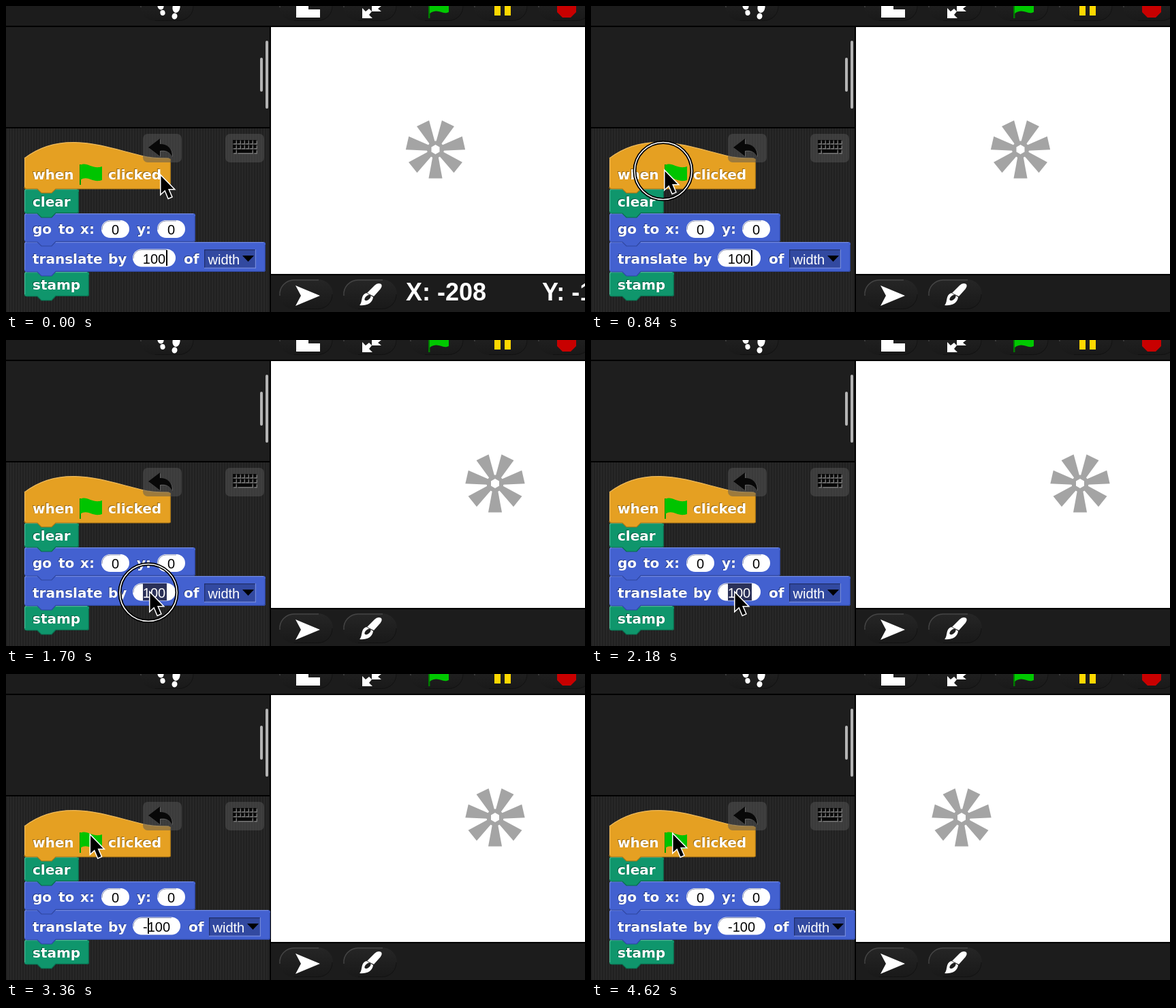
An HTML page with a canvas for the animation above (4.64 s loop, 850 by 450 pixels).

```html
<!DOCTYPE html>
<html lang="en">
<head>
<meta charset="utf-8">
<style>
html, body { margin: 0; width: 850px; height: 450px; overflow: hidden; background: #1c1c1c; }
canvas { display: block; }
</style>
</head>
<body>
<canvas id="stage" width="850" height="450"></canvas>
<script>
const c = document.getElementById('stage').getContext('2d');
const LOOP = 4640;
const LABEL = 'bold 20px "DejaVu Sans", sans-serif';
const VALUE = '20px "Liberation Sans", Arial, sans-serif';
const STATUS = 'bold 36px "Liberation Sans", Arial, sans-serif';

// Cursor keys: time, x, y
const route = [[0, 227, 249], [430, 108, 242], [1210, 108, 242], [1600, 211, 371],
  [2880, 211, 371], [3300, 126, 238], [3440, 120, 235], [LOOP, 120, 235]];
const clicks = [[620, 860], [1640, 1880], [3560, 3780]];

function rect(x, y, w, h, color) {
  c.fillStyle = color;
  c.fillRect(x, y, w, h);
}

function round(x, y, w, h, r, color) {
  c.beginPath();
  c.roundRect(x, y, w, h, r);
  c.fillStyle = color;
  c.fill();
}

function shape(d, fill, stroke, width = 1) {
  const path = new Path2D(d);
  if (stroke) {
    c.strokeStyle = stroke;
    c.lineWidth = width;
    c.stroke(path);
  }
  if (fill) {
    c.fillStyle = fill;
    c.fill(path);
  }
}

function text(s, x, y, font, color = '#fff', align = 'left') {
  c.font = font;
  c.textAlign = align;
  c.fillStyle = color;
  c.fillText(s, x, y);
}

function label(s, x, y) {
  text(s, x - 1, y - 1, LABEL, 'rgba(0,0,0,.35)');
  text(s, x, y, LABEL);
}

function ellipse(x, y, rx, ry, turn = 0, color = '#fff') {
  c.beginPath();
  c.ellipse(x, y, rx, ry, turn, 0, 7);
  c.fillStyle = color;
  c.fill();
}

function pill(x, y) {
  const g = c.createLinearGradient(0, y, 0, y + 44);
  g.addColorStop(0, '#262626');
  g.addColorStop(.5, '#1f1f1f');
  g.addColorStop(1, '#191919');
  round(x, y, 79, 44, 22, g);
  shape(`M${x + 1} ${y + 24}A21 21 0 0 1 ${x + 22} ${y + 1}H${x + 58}`, null, '#444', 1.5);
  shape(`M${x + 22} ${y + 43.5}H${x + 57}A21 21 0 0 0 ${x + 78} ${y + 22}`, null, '#121212');
}

function controls() {
  for (const x of [197, 401, 495, 593, 687, 781]) pill(x, -22);
  pill(401, 402);
  pill(495, 402);
  ellipse(227, 0, 4.5, 5.5, -.2);
  ellipse(230, 10, 3.6, 4, -.2);
  ellipse(250, 2, 5.5, 8, .15);
  ellipse(247.5, 15, 4, 4.5, .15);
  shape('M426 0H444V5H461V17H426Z', '#fff');
  shape('M523 3V18H538L533 13L537 8L533 4L528 8ZM537 0V8H551L546 4L551 0Z', '#fff');
  rect(620, 0, 2.5, 18, '#007a00');
  shape('M622 0H650V9C640 14 635 2 622 11Z', '#00c800');
  rect(717, 0, 9, 14, '#ffd800');
  rect(732, 0, 9, 14, '#ffd800');
  shape('M809 0H837V9L829 17H817L809 9Z', '#c80000');
  shape('M425 411L461 426L425 441L433 426Z', '#fff');
  shape('M547 408C553 408 553 413 548 418L540 427L530 422L541 411Q544 408 547 408Z', '#fff');
  shape('M529 422L539 428C538 438 528 441 519 440C524 436 520 425 529 422Z', '#fff');
  ellipse(531, 429, 5.5, 3, -.7, '#1f1f1f');
}

function panels() {
  rect(0, 0, 850, 450, '#1c1c1c');
  controls();
  rect(0, 29, 850, 2, '#000');
  rect(0, 31, 387, 147, '#1e1e1e');
  rect(0, 178, 387, 2, '#000');
  for (let x = 0; x < 387; x += 4) {
    rect(x, 180, 2, 270, '#212121');
    rect(x + 2, 180, 2, 270, '#282828');
  }
  rect(387, 30, 2, 420, '#000');
  rect(389, 31, 461, 363, '#fff');
  rect(389, 394, 461, 2, '#000');
  round(373, 76, 4, 50, 2, '#b4b4b4');
  round(381, 51, 4, 100, 2, '#b4b4b4');
}

function wheel(x) {
  c.save();
  c.translate(x, 211);
  for (let i = 0; i < 7; i++) {
    shape('M-4 10L-10 42.5H10L4 10Z', '#a4a4a4');
    c.rotate(Math.PI * 2 / 7);
  }
  ellipse(0, 0, 12.5, 12.5, 0, '#a4a4a4');
  shape('M0 -7L6 -3.5V3.5L0 7L-6 3.5V-3.5Z', '#fff');
  c.restore();
}

function block(top, bottom, right, color, light, dark) {
  const tab = `H73L67 ${bottom + 6}H52L46 ${bottom}`;
  shape(`M27 ${top + 3}Q27 ${top} 30 ${top}H${right - 3}Q${right} ${top} ${right} ${top + 3}` +
    `V${bottom - 3}Q${right} ${bottom} ${right - 3} ${bottom}${tab}H30Q27 ${bottom} 27 ${bottom - 3}Z`, color);
  shape(`M27.6 ${bottom - 3}V${top + 3}Q28 ${top + .6} 30 ${top + .6}H${right - 3}`, null, light, 1.2);
  shape(`M${right - .6} ${top + 4}V${bottom - 3}Q${right - 1} ${bottom - 1} ${right - 3} ${bottom - .6}${tab}H30`, null, dark, 1.2);
}

function hat() {
  const top = 'M27 224C75 187 130 202 175 214S215 223 239 224';
  const bottom = 'V266Q242 269 239 269H73L67 275H52L46 269H30Q27 269 27 266';
  shape(`${top}Q242 224 242 227${bottom}Z`, '#e5a022');
  shape(top, null, '#edb95b', 1.2);
  shape('M27.6 266V225', null, '#edb95b', 1.2);
  shape(`M241.4 227${bottom}`, null, '#a87516', 1.2);
  label('when', 39, 255);
  label('clicked', 150, 255);
  rect(108, 233, 2, 30, '#00a000');
  shape('M109 234C119 228 127 241 141 236V256C127 261 120 248 109 256Z', '#00c400');
}

function field(x, y, w, value) {
  round(x, y, w, 26, 13, '#fff');
  shape(`M${x + 1} ${y + 14}A12 12 0 0 1 ${x + 13} ${y + 1}H${x + w - 13}`, null, '#8b93b3');
  text(value, x + w / 2, y + 21, VALUE, '#000', 'center');
}

function script(t) {
  const negative = t >= 2840, shift = negative ? 7 : 0;
  const blue = ['#4361d0', '#7188de', '#2f469f'];
  const teal = ['#0f966c', '#4fb594', '#0a6b4d'];
  block(391, 427, 122, ...teal);
  block(347, 391, 381 + shift, ...blue);
  block(305, 347, 278, ...blue);
  block(269, 305, 107, ...teal);
  hat();
  label('clear', 39, 295);
  label('go', 39, 335);
  label('to', 77, 335);
  label('x:', 109, 335);
  label('y:', 192, 335);
  field(140, 315, 41, '0');
  field(222, 315, 41, '0');
  label('translate', 39, 379);
  label('by', 150, 379);
  label('of', 261 + shift, 379);
  label('stamp', 39, 417);
  field(186, 357.5, 63 + shift, negative ? '-100' : '100');
  if (t >= 1660 && t < 2200) {
    rect(201, 358, 35, 25, '#2b3158');
    text('100', 217.5, 378.5, VALUE, '#fff', 'center');
  }
  const caret = t < 850 ? 235 : t >= 2200 && t < 2840 ? 201 : negative && t < 3760 ? 208 : 0;
  if (caret) rect(caret, 359, 2, 23, '#000');

  const x = 291 + shift;
  rect(x, 358, 76, 28, '#3249a0');
  shape(`M${x + .6} 386V358.6H${x + 76}`, null, '#202f6b', 1.2);
  shape(`M${x} 385.4H${x + 75.4}V358`, null, '#7389dc', 1.2);
  text('width', x + 5.5, 380, VALUE);
  shape(`M${x + 56} 367H${x + 73}L${x + 64.5} 376Z`, '#000');
}

function editButtons() {
  for (const x of [201, 322]) round(x, 188, 57, 42, 7, 'rgba(86,86,86,.5)');
  const undo = 'M209 208L226 195V203C238 203 244 210 244 221C239 214 235 212 226 213V221Z';
  c.save();
  c.translate(1, 1);
  shape(undo, '#666');
  c.restore();
  shape(undo, '#080808');
  for (const [offset, color] of [[1.5, '#777'], [0, '#080808']]) {
    for (let row = 0; row < 3; row++)
      for (let i = 0; i < 6; i++)
        if (row < 2 || i % 5 === 0) rect(333 + i * 6 + offset, 197 + row * 7 + offset, 4.5, 5, color);
    rect(339 + offset, 211 + offset, 22.5, 5, color);
  }
}

function pointer(t) {
  const i = Math.max(1, route.findIndex(key => key[0] > t));
  const [t0, x0, y0] = route[i - 1], [t1, x1, y1] = route[i];
  const p = (t - t0) / (t1 - t0), ease = p * p * (3 - 2 * p);
  const x = x0 + (x1 - x0) * ease, y = y0 + (y1 - y0) * ease;
  if (clicks.some(([from, to]) => t >= from && t < to)) {
    for (const [width, color] of [[5, '#000'], [1.6, '#fff']]) {
      c.beginPath();
      c.arc(x - 2, y + .5, 42, 0, 7);
      c.lineWidth = width;
      c.strokeStyle = color;
      c.stroke();
    }
  }
  if (t >= 2200 && t < 2880) return;
  c.save();
  c.translate(x, y);
  shape('M0.5 1V27L6.5 21.5L11.5 33.5L16 31.5L11 20H19Z', '#000', '#fff', 3);
  c.restore();
}

function draw(now) {
  const t = now % LOOP;
  panels();
  wheel(t < 880 ? 630.5 : t < 3780 ? 718 : 544);
  script(t);
  editButtons();
  if (t < 100) {
    text('X: -208', 587, 433, STATUS);
    text('Y: -104', 787, 433, STATUS);
  }
  pointer(t);
  requestAnimationFrame(draw);
}
requestAnimationFrame(draw);
</script>
</body>
</html>
```
